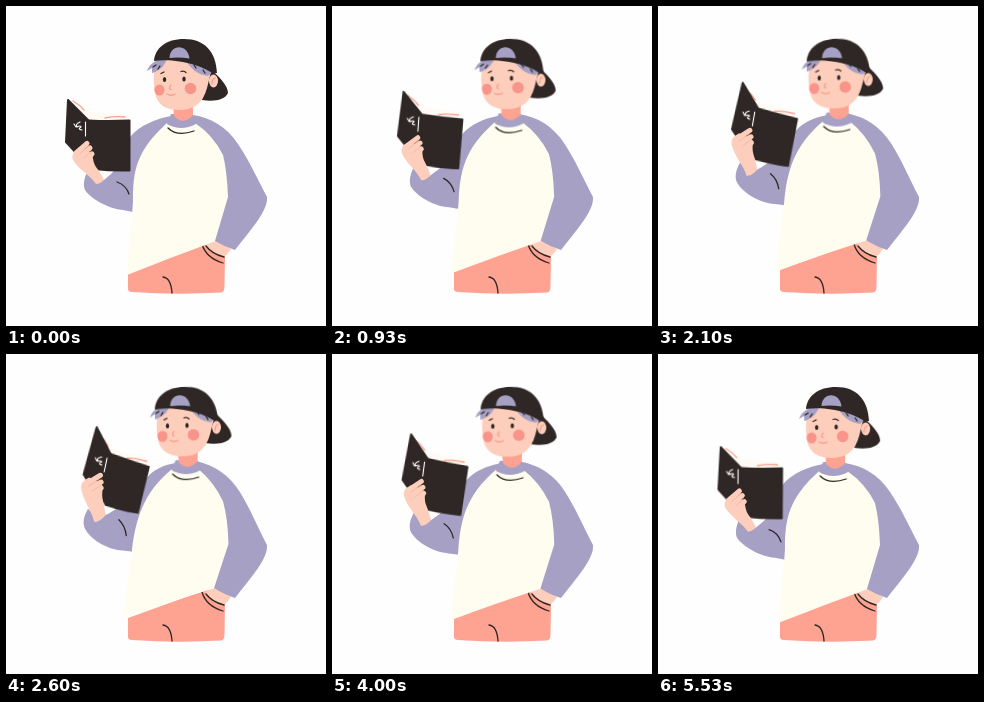
Write an HTML page that moves like this. It is 320x320 px and loops after 5.61 s.

```html
<!DOCTYPE html>
<html lang="en">
<head>
<meta charset="utf-8">
<title>Reader in a cap</title>
<style>
  html, body { margin: 0; width: 100%; height: 100%; overflow: hidden; background: #fefefe; }
  svg { display: block; width: 100%; height: 100%; }

  .lav { fill: #a6a0c4; }
  .cream { fill: #fffdef; }
  .skin { fill: #fdcebb; }
  .coral { fill: #fea292; }
  .dark { fill: #2f2725; }
  .cheek { fill: #f8948a; }
  .line { fill: none; stroke: #2f2725; stroke-width: 1.3; stroke-linecap: round; stroke-linejoin: round; }
  .pink { stroke: #f8a08f; }
  .white { stroke: #fff; stroke-width: 1.1; }
  .cover { stroke: #2f2725; stroke-width: 2; stroke-linejoin: round; }
  .finger { fill: none; stroke: #fdcebb; stroke-width: 5; stroke-linecap: round; }
  .gap { fill: none; stroke: #f3b09d; stroke-width: .7; stroke-linecap: round; }

  /* half a loop out, half a loop back */
  .morph, .book, .face, .cap, .brim, .neck { animation: 2805ms linear infinite alternate; }
  .morph { animation-name: morph; }
  .book { animation-name: tilt; transform-origin: 147px 213px; }
  .neck { animation-name: lean; }
  .face { animation-name: turn; animation-timing-function: ease-out; }
  .cap { animation-name: nod; animation-timing-function: ease-out; transform-origin: 172px 55px; }
  .brim { animation-name: lift; animation-timing-function: ease-out; }

  @keyframes morph { from { d: var(--a); } to { d: var(--b); } }
  @keyframes tilt { to { transform: rotate(12.9deg); } }
  @keyframes lean { to { transform: translate(5px, -2px); } }
  @keyframes turn { to { transform: translate(3px, -1.7px); } }
  @keyframes nod { to { transform: translate(.8px, 0) rotate(-1.5deg); } }
  @keyframes lift { to { transform: translate(3.5px, -5px); } }
</style>
</head>
<body>
<svg viewBox="0 0 320 320">
  <!-- trousers and pocket hand -->
  <path class="coral" d="M122 264V283Q122 286 126 286Q170 289 215 286.500Q218.500 286 218.500 280L219 250L205 234Z"/>
  <path class="skin" d="M209 233L225 243Q222 248 218 251Q206 249 199 238Z"/>
  <path class="line" d="M200 240Q206 248 218 251M196 238Q200 252 217 257"/>
  <path class="line" d="M157 271Q165 272 166 287"/>

  <!-- raised sleeve -->
  <path class="lav morph" style="
    --a: path('M165 110C150 113 134 119 124 131L112 160Q106 168 98 174Q90 174 82 164C78 172 77 179 79 184C85 193 103 203 117 204L127 206L140 206L165 118Z');
    --b: path('M170 109C157 111 149 116 143 122L118 148Q109 156 100 160Q91 164 82 154C78 161 76 168 79 174C84 184 100 195 117 196L127 197L140 197L169 118Z')"/>
  <path class="line morph" style="
    --a: path('M111 176Q120 179 123 188');
    --b: path('M113 165Q119 171 120 181')"/>

  <!-- shirt -->
  <path class="cream morph" style="
    --a: path('M161 117Q175 130 190 117Q207 129 217 149Q221 165 222 191L210 235Q166 251 121 269C122 245 126 215 127 195C127 165 130 145 161 117Z');
    --b: path('M166 115Q180 128 195 115Q208 128 217 147Q222 165 222.500 190L209 234Q165 247 117 264C119 245 124 215 126 195C130 165 138 138 166 115Z')"/>
  <path class="lav morph" style="
    --a: path('M187 109C205 112 220 120 232 138C243 154 252 174 261 191C262 205 246 222 229 244Q219 241 209 235L222 191Q221 165 217 149Q207 129 189 117Z');
    --b: path('M191 107C208 111 223 120 234 138C244 154 252 174 261 191C262 205 246 222 229 244Q219 241 208 234L222.500 190Q222 165 217 147Q208 128 193 115Z')"/>
  <g class="neck">
    <path class="lav" d="M165 108L187 108L190 118Q175 126 161 118Z"/>
    <path class="coral" d="M167 98H187V109Q177 120 168 110Z"/>
    <path class="line" d="M162 122Q171 131 188 125"/>
  </g>

  <!-- head -->
  <path class="dark brim" d="M204 62C212 70 222 79 222 87C219 94 208 96 196 94Z"/>
  <g class="face">
    <path class="skin" d="M150 56C147 66 147 82 150 91C154 101 163 104 173 104C188 104 197 97 201 82L206 62L180 50Z"/>
    <ellipse class="skin" cx="207.500" cy="75" rx="4.500" ry="6.500"/>
    <path class="line pink" d="M206 78Q206 73 209 72"/>
    <ellipse class="cheek" cx="153.500" cy="84" rx="5" ry="5.500"/>
    <circle class="cheek" cx="184.500" cy="82.500" r="5.800"/>
    <path class="lav" d="M154 53C147 56 143 59 141 65L146 62L146 67C153 65 158 61 161 53Z"/>
    <path class="lav" d="M179 52C183 62 192 69 202 70L206 66L198 54Z"/>
    <path class="line" d="M147 61L150 59M152 63L154 60M188 59L190 62M197 64L199 67"/>
    <ellipse class="dark" cx="158.500" cy="73.500" rx="1.700" ry="2.500"/>
    <ellipse class="dark" cx="178" cy="73" rx="1.700" ry="2.500"/>
    <path class="line" d="M155 67.500L158 66M175 65.500Q178 64.500 180 66.500"/>
    <path class="line pink" d="M165 79Q162 83 165 83.500M161 88Q165 90.500 169 88"/>
  </g>
  <g class="cap">
    <path class="dark" d="M148 55C149 42 160 33 178 33C199 33 210 46 211 67L206 67C196 60 172 52 148 55Z"/>
    <path class="lav" d="M163.500 52C164 37.500 182 37.500 183.500 52.500Q173 51 163.500 52Z"/>
  </g>

  <!-- book -->
  <g class="book">
    <path fill="#fffaf3" d="M64 92L83 106L119 108V115H82Z"/>
    <path class="line pink" d="M67 95Q74 99 78 104M99 112Q109 110 119 111"/>
    <path class="dark cover morph" style="
      --a: path('M82.500 114.500Q103 115.500 123.500 114.500L123.500 164.500Q105 165 88 163L82.500 155Z');
      --b: path('M82 111Q103 114 122 116L120.500 163Q105 164 88 162L82.500 155Z')"/>
    <path class="dark cover morph" style="
      --a: path('M62 94L82 114L84 162L60 136Z');
      --b: path('M63 87.500L82 111L84 162L60 137Z')"/>
    <path class="line white" d="M79.500 116V130"/>
    <path class="line white" d="M68 118L70 121M74 116Q69 118 71 121Q75 119 75 121Q71 123 76 124"/>
  </g>

  <!-- hand -->
  <path class="skin morph" style="
    --a: path('M67 154C65 149 68 146 73 143L84 146C88 149 86 155 90 161C94 166 96 170 98 174Q94 178 90 178C84 169 72 163 67 154Z');
    --b: path('M76 134C75 128 78 125 84 122L96 128C99 131 96 137 97 143C98 149 99 155 100 160Q93 168 88 167C86 156 78 146 76 134Z')"/>
  <path class="finger morph" style="
    --a: path('M70 147L81 137.500M74 150L84 142M79 154L86 148');
    --b: path('M80 129L95.500 120M84 133L96 127M88 139L96 133')"/>
  <path class="gap morph" style="
    --a: path('M74 148L82 140.500M78 152L85 145.500');
    --b: path('M83 131L94 124M87 136L95 130.500')"/>
</svg>
</body>
</html>
```
